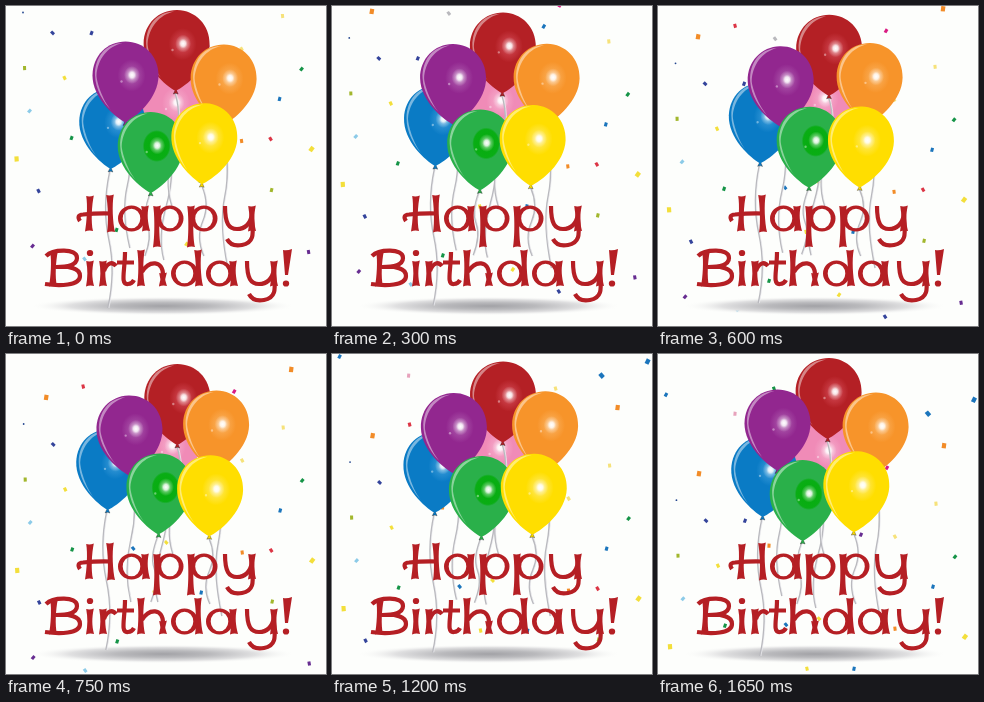
An HTML page for the animation above (1.8 s loop, 320x320 px).

```html
<!DOCTYPE html>
<html lang="en">
<head>
<meta charset="utf-8">
<title>Happy Birthday!</title>
<style>
html, body { margin: 0; width: 100%; height: 100%; overflow: hidden; background: #fdfefc; }
svg { display: block; width: 100vw; height: 100vh; }
</style>
</head>
<body>
<svg id="stage" viewBox="0 0 320 320" role="img" aria-label="Happy Birthday!">
  <defs id="defs">
    <radialGradient id="shade">
      <stop offset="0" stop-color="#a2a2a6"/>
      <stop offset=".35" stop-color="#b9b9bc"/>
      <stop offset=".7" stop-color="#e0e0e1"/>
      <stop offset="1" stop-color="#fdfefc" stop-opacity="0"/>
    </radialGradient>
    <radialGradient id="shine">
      <stop offset="0" stop-color="#fff"/>
      <stop offset=".3" stop-color="#fff" stop-opacity=".85"/>
      <stop offset=".55" stop-color="#fff" stop-opacity=".35"/>
      <stop offset="1" stop-color="#fff" stop-opacity="0"/>
    </radialGradient>
  </defs>
  <g id="confetti"></g>
  <ellipse cx="157" cy="300" rx="133" ry="9.5" fill="url(#shade)"/>
  <g id="balloons"><g id="strings" fill="none"></g></g>
  <g id="lettering" stroke="#b51f24" stroke-linejoin="round"></g>
</svg>
<script>
const LOOP = 1800, STEP = 150, FALL = 12.7, DRIFT = 0.13;
const byId = id => document.getElementById(id);

function add(parent, tag, attrs) {
  const el = document.createElementNS('http://www.w3.org/2000/svg', tag);
  for (const key in attrs) el.setAttribute(key, attrs[key]);
  parent.appendChild(el);
  return el;
}
const mix = (a, b, p) => a + (b - a) * p;

// Confetti: colour letter (capital = large), start x, start y
const COLORS = {
  n: '#34449b', b: '#1b75bc', l: '#8ccbe8', g: '#159447', o: '#f28c28', r: '#dc3545',
  y: '#f3df3b', p: '#672d91', e: '#a2b72d', m: '#d91b82', k: '#e7a3bc', s: '#b9b9bd', c: '#f6e27a'
};
const PIECES = `n46 27,n85 27,e18 62,y58 72,l23 105,g65 132,Y10 153,n32 185,p26 240,
g110 224,c276 10,c235 43,g295 63,b273 93,o235 135,r264 133,Y305 143,e265 184,p302 246,
n226 260,y180 238,b194 175,y147 175,l78 253,b211 -5,O39 -20,r76 -31,s116 -18,m227 -26,
O284 -48,c222 -67,b126 131,b6 -99,k75 -80,g114 -105,B268 -80,B314 -94,o109 52,r151 72,
y159 125,p201 41`.split(',').map((item, i) => {
  const [, c, x, y] = item.trim().match(/(\w)(\d+) (-?\d+)/);
  const big = c < 'a', r = big ? 3.3 : 2.5, turn = i * 67 % 90;
  const el = add(byId('confetti'), 'path', {
    d: `M${-r} -.4L-.3 ${-r}L${r} .2L.5 ${r}Z`, fill: COLORS[c.toLowerCase()]
  });
  return { el, x: +x + 0.5, y: +y, turn };
});
const speck = add(byId('confetti'), 'circle', { r: 0.9, fill: '#24478f' });

// Strings: top and bottom at both ends of the sway, then bend
const STRINGS = [
  [104, 165, 101, 157, 102, 302, 100, 296, 5],
  [119, 117, 125, 123, 124, 242, 125, 248, -5],
  [144, 188, 152, 182, 139, 250, 145, 248, 4],
  [163, 145, 159, 140, 158, 254, 152, 248, -5],
  [169, 86, 171, 92, 166, 200, 167, 200, -6],
  [196, 180, 203, 184, 198, 250, 204, 250, -5],
  [216, 118, 209, 115, 222, 262, 216, 262, -5]
].map(pts => ({
  pts,
  lines: [['#b9b9be', 1.7], ['#f3f3f5', 0.7]].map(([stroke, w], i) =>
    add(byId('strings'), 'path', { stroke, 'stroke-width': w, transform: `translate(${i * 0.9} 0)` }))
}));

// Balloons: body, glow, glow edge, centre and tilt at both ends of the sway
const BODY = 'M0 41C-10 36-33 17-33-6C-33-26-18-40 0-40C18-40 33-26 33-6C33 17 10 36 0 41Z';
const RIM = 'M-3-38.5C-20-38-31-24-30.5-6C-30 8-22 21-14 29C-23 19-29-0-29-6C-28-22-18-35-3-38.5Z';
const BALLOONS = [
  ['#f08bb7', '#f6b3d0', 0.5, 164, 103, 160, 98, 0, 0],
  ['#b42025', '#d8505c', 0.5, 170.5, 44, 171.3, 50, 1, 0],
  ['#f7942a', '#fbb565', 0.5, 217.5, 78.5, 210, 76.5, 1, 1],
  ['#0a7bc5', '#42a0dc', 0.5, 106, 122, 103, 115, 2, 2],
  ['#92278f', '#b263b2', 0.5, 119.5, 75.5, 123.7, 81.5, 0, -2],
  ['#2ab04a', '#05ad0d', 0.88, 144.7, 146, 153.3, 139.5, 0, 1],
  ['#ffde00', '#ffec78', 0.5, 198, 137.3, 204, 141.3, 3, 1]
].map(([body, glow, edge, ...pose], i) => {
  const grad = add(byId('defs'), 'radialGradient', { id: 'glow' + i });
  [[0, 1], [edge, edge], [1, 0]].forEach(([offset, alpha]) =>
    add(grad, 'stop', { offset, 'stop-color': glow, 'stop-opacity': alpha }));
  const el = add(byId('balloons'), 'g', {});
  add(el, 'path', { d: 'M0 39L-2.4 44Q0 42.5 2.4 44Z', fill: body, stroke: '#0006', 'stroke-width': 0.8 });
  add(el, 'path', { d: BODY, fill: body });
  add(el, 'path', { d: RIM, fill: '#fff', 'fill-opacity': 0.45 });
  add(el, 'ellipse', { cx: 6, cy: -6, rx: 14, ry: 16, fill: `url(#glow${i})` });
  add(el, 'ellipse', { cx: 6.5, cy: -6.5, rx: 8, ry: 9, fill: 'url(#shine)' });
  add(el, 'circle', { cx: -4, cy: 0, r: 1.2, fill: '#fff', 'fill-opacity': 0.4 });
  return { el, pose };
});
BALLOONS[0].el.after(byId('strings'));

// Hand-drawn letters, baseline at y = 0: flared stems and rings are filled, lines are stroked
const stem = (x, top, foot = 0, lean = 0) => {
  const x2 = x + lean;
  return `M${x - 3.8} ${top}Q${x} ${top + 1} ${x + 3.8} ${top - 0.6}` +
    `C${x + 1.8} ${top + 9} ${x2 + 1.8} ${foot - 9} ${x2 + 4} ${foot}` +
    `Q${x2} ${foot - 1} ${x2 - 4} ${foot + 0.4}C${x2 - 2.2} ${foot - 9} ${x - 2.2} ${top + 9} ${x - 3.8} ${top}Z`;
};
const oval = (cx, cy, rx, ry) =>
  `M${cx - rx} ${cy}a${rx} ${ry} 0 1 0 ${2 * rx} 0a${rx} ${ry} 0 1 0 ${-2 * rx} 0Z`;
const ring = cx => oval(cx, -12.5, 13.5, 13) + oval(cx, -12.5, 8.8, 9.8);
const dot = (x, y) => oval(x, y, 3.2, 3.1);

const GLYPHS = {
  H: { fill: [stem(13, -35, 0, -1), stem(33, -36, 1, 1)], line: 'M3-10Q-1-16 6-16.5Q20-18 34-17.5' },
  a: { fill: [ring(13.5), stem(27, -25, 0, 1)] },
  p: { fill: [stem(5, -25, 16), ring(18)] },
  y: { fill: [stem(32, -25, 0)], line: 'M5-25C5-7 9-2 17-2C25-2 30-7 32-16C32-2 37 11 22 14Q11 16 7 8' },
  B: { fill: [stem(9, -34, 0, -1)], line: 'M1-30C8-37 32-38 32-28C32-20 20-19 11-19C24-20 35-18 35-10C35 0 14 0 0-2' },
  i: { fill: [stem(4, -25), dot(4, -33)] },
  r: { fill: [stem(4, -25)], line: 'M5-15C8-23 13-25 17-20' },
  t: { fill: [], line: 'M8-34C8-15 3-1 11-2Q15-2 17-6M0-23.5H17' },
  h: { fill: [stem(5, -36), stem(27, -13)], line: 'M6-14C13-26 27-26 27-11' },
  d: { fill: [ring(13.5), stem(27, -36, 0, 1)] },
  '!': { fill: ['M1-36Q5-35 10-37L6-11H3Z', dot(4, -2.5)] }
};
function write(text, stops, base) {
  [...text].forEach((ch, i) => {
    const { fill, line } = GLYPHS[ch];
    const g = add(byId('lettering'), 'g', { transform: `translate(${stops[i]} ${base})` });
    for (const d of fill) add(g, 'path', { d, fill: '#b51f24', 'fill-rule': 'evenodd', stroke: 'none' });
    if (line) add(g, 'path', { d: line, fill: 'none', 'stroke-width': 4.2 });
  });
}
write('Happy', [71, 112, 146, 180, 214], 225);
write('Birthday!', [39, 80, 93, 111, 130, 165, 200, 236, 276], 280);

function draw(ms) {
  const k = Math.floor((ms % LOOP) / STEP);
  const p = Math.min(k, 11 - k) / 5;

  for (const { el, x, y, turn } of PIECES)
    el.setAttribute('transform', `translate(${x + k * DRIFT} ${y + k * FALL}) rotate(${turn})`);
  speck.setAttribute('cx', 17 + k * DRIFT);
  speck.setAttribute('cy', 6.5 + k * FALL);

  for (const { pts: s, lines } of STRINGS) {
    const x = mix(s[0], s[2], p), y = mix(s[1], s[3], p);
    const x2 = mix(s[4], s[6], p), y2 = mix(s[5], s[7], p);
    const mx = (x + x2) / 2, my = (y + y2) / 2, h = (y2 - y) / 6, b = s[8];
    const d = `M${x} ${y}C${x - b} ${y + h} ${mx - b} ${my - h} ${mx} ${my}S${x2 + b} ${y2 - h} ${x2} ${y2}`;
    for (const line of lines) line.setAttribute('d', d);
  }

  for (const { el, pose: [x, y, x2, y2, a, a2] } of BALLOONS)
    el.setAttribute('transform',
      `translate(${mix(x, x2, p)} ${mix(y, y2, p)}) rotate(${mix(a, a2, p)})`);
}

const start = performance.now();
function tick() {
  draw(performance.now() - start);
  requestAnimationFrame(tick);
}
tick();
</script>
</body>
</html>
```
